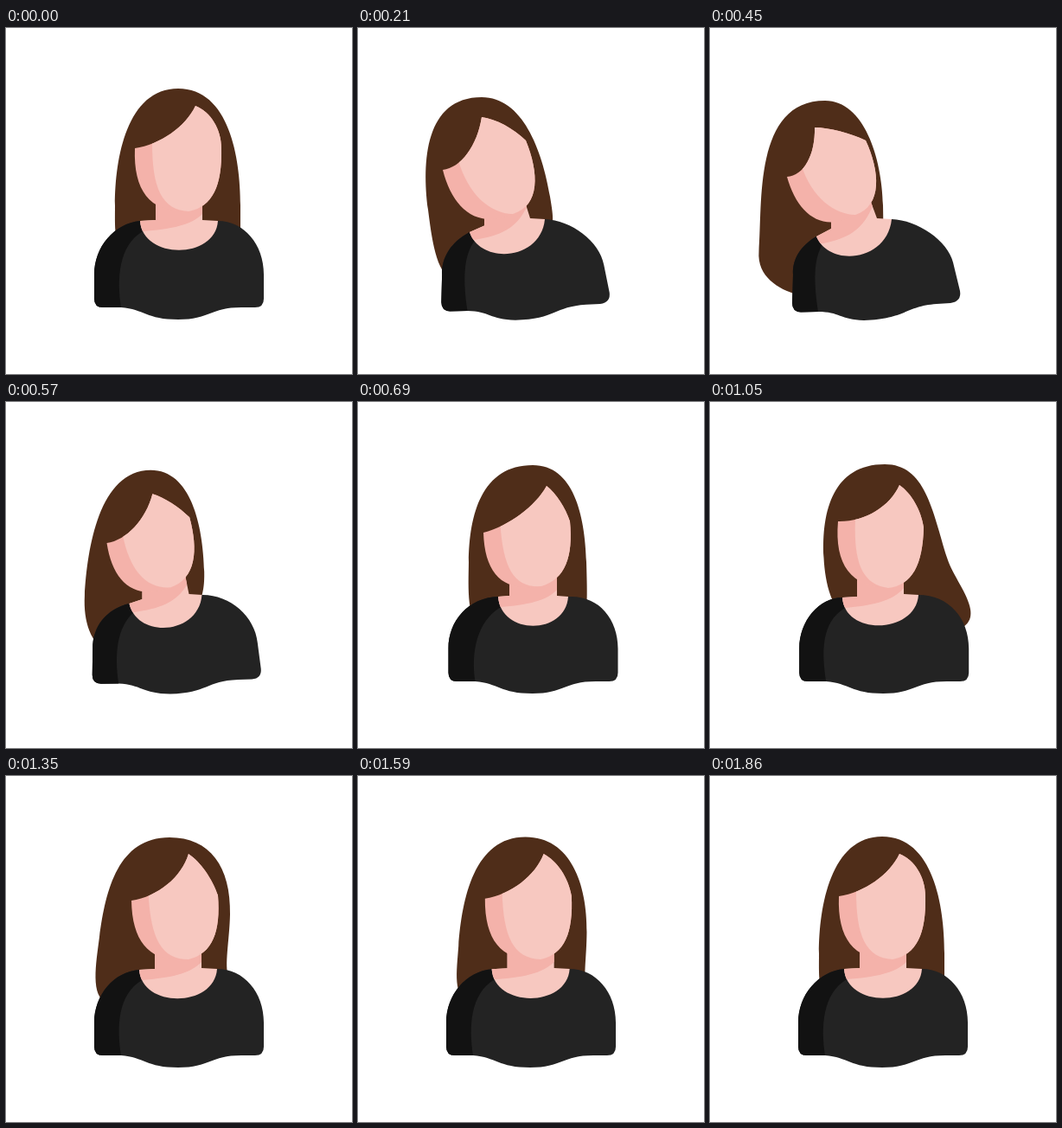
These frames come from a looping animation (400 px wide and 400 px high, 6.89 s). An HTML page with a canvas:

```html
<!DOCTYPE html>
<html lang="en">
<head>
<meta charset="utf-8">
<title>Head tilt</title>
<style>
  html, body { margin: 0; width: 100%; height: 100%; overflow: hidden; background: #fff; }
  canvas { display: block; width: 400px; height: 400px; }
</style>
</head>
<body>
<canvas id="stage" width="400" height="400"></canvas>
<script>
const LOOP = 6890, STEP = 30, END = 1860;
const COLOR = { hair: '#4f2d19', shirt: '#232323', shade: '#121212', skin: '#f7c8c0', blush: '#f4b2aa' };
const ctx = document.getElementById('stage').getContext('2d');

// Smooth interpolation that never overshoots its keys; the last key returns to the first.
function track(keys) {
  const rows = [...keys, [END, ...keys[0].slice(1)]];
  const rate = (i, k) => (rows[i + 1][k] - rows[i][k]) / (rows[i + 1][0] - rows[i][0]);
  const slope = (i, k) => {
    if (i === 0 || i === rows.length - 1) return 0;
    const a = rate(i - 1, k), b = rate(i, k);
    return a * b > 0 ? 2 * a * b / (a + b) : 0;
  };
  return t => {
    let i = 0;
    while (i < rows.length - 2 && t >= rows[i + 1][0]) i++;
    const span = rows[i + 1][0] - rows[i][0], u = (t - rows[i][0]) / span;
    const s = u * u * (3 - 2 * u), p = u * (1 - u) * (1 - u), q = u * u * (u - 1);
    return rows[i].slice(1).map((v, n) => {
      const k = n + 1;
      return v + (rows[i + 1][k] - v) * s + span * (p * slope(i, k) + q * slope(i + 1, k));
    });
  };
}

// time, lean, sideways shift
const bodyAt = track([[0, 0, 0], [210, 0.81, 0], [450, 1, 0], [690, 0, 2.5], [1050, 0, 1.2], [1350, 0, 0]]);

// time, left tip, left side and its slant, crown and its width, right side and its slant, right tip
const hairAt = track([
  [0, 124, 255, 126, 205, 0, 199, 70, 59, 271, 205, 0, 271, 240],
  [210, 90, 285, 81, 210, -0.13, 143, 80, 47, 222, 195, -0.17, 225, 222],
  [450, 80, 302, 56.5, 258, 0.08, 133, 84, 45, 200, 205, -0.02, 200, 222],
  [690, 125, 255, 128, 185, 0.01, 202, 73, 47, 264, 185, -0.03, 265, 225],
  [900, 149, 243, 133, 175, -0.06, 203, 72.5, 47, 276, 180, -0.31, 350, 250],
  [1050, 141, 243, 131.5, 180, -0.05, 202, 72, 47, 274, 180, -0.31, 324, 250],
  [1350, 97, 256, 108, 186, 0.13, 189, 71, 47, 259, 160, 0.02, 252, 219]
]);

// time, neckline left, neckline right, collar width
const neckAt = track([
  [0, 155, 223, 245, 223, 18],
  [210, 129, 236, 216, 221, 17],
  [450, 123, 241, 210, 221, 17],
  [690, 162, 225, 243, 225, 13],
  [1050, 153, 226, 241, 223, 17],
  [1350, 154, 224, 244, 223, 18]
]);

// time, fringe start, parting, right temple, chin, bulge of the fringe, bulge of the forehead
const faceAt = track([
  [0, 149, 139, 219, 90, 249, 139, 211, 212, 0.155, 0.2],
  [210, 98, 164, 143, 103, 194, 130, 179, 215, 0.205, 0.1],
  [450, 89, 172, 121, 115, 180, 130, 168, 216, 0.25, 0.065],
  [690, 145, 151, 218, 97, 245, 138, 212, 213, 0.125, 0.09],
  [1050, 148, 138, 219, 96, 247, 145, 206, 215, 0.195, 0.13],
  [1350, 145, 144, 211, 90, 245, 138, 211, 212, 0.185, 0.1]
]);

const upright = [125,226, 102,253, 102,285, 102,313, 102,323, 112,323, 133,323, 160,325, 162,337, 199,337,
  236,337, 236,323, 272,323, 288,323, 298,323, 298,313, 298,285, 298,250, 275,223];
const leaning = [104,252, 95,268, 96,285, 95,318, 95,328, 105,328.5, 125,328, 150,328, 150,337, 178,338,
  228,336, 224,322, 262,319, 278,318, 291,316, 289,304, 281,271, 275,246, 240,222];

const SIZE = { M: 2, L: 2, Q: 4, C: 6 };
function shape(cmds, nums) {
  let at = 0;
  return new Path2D([...cmds].map(c => c + nums.slice(at, at += SIZE[c]).join(' ')).join('') + 'Z');
}

const add = (p, x, y) => [p[0] + x, p[1] + y];

// Point beside the line from a to b: part of the way along, pushed out by a share of its length.
function beside(a, b, along, out) {
  const x = b[0] - a[0], y = b[1] - a[1];
  return add(a, along * x - out * y, along * y + out * x);
}

function fill(path, color) {
  ctx.fillStyle = color;
  ctx.fill(path);
}

function fillInside(clip, path, color) {
  ctx.save();
  ctx.clip(clip);
  fill(path, color);
  ctx.restore();
}

function drawHair(t, lean) {
  const [ax, ay, lx, ly, ls, tx, ty, wide, rx, ry, rs, bx, by] = hairAt(t);
  fill(shape('MCCCC', [
    ax + 20, ay + 6, ax, ay, lx - 30 * ls, ly + 30, lx, ly,
    lx + 55 * ls, ly - 55, tx - 59 - 24 * lean ** 6, ty, tx, ty,
    tx + wide, ty, rx + 55 * rs, ry - 55, rx, ry,
    rx - 30 * rs, ry + 30, bx, by, rx + (bx - rx) * 0.22, by + 14
  ]), COLOR.hair);
}

function drawTorso(t, lean, shift) {
  const [lx, ly, rx, ry, collar] = neckAt(t);
  const left = [lx, ly], right = [rx, ry];
  const shadeStart = add(left, 3 + 5 * lean, 12 - 4 * lean);

  const body = upright.map((v, i) => v + (leaning[i] - v) * lean + (i % 2 ? 0 : shift));
  const hem = body.slice(12, 14);
  fill(shape('MCLQLCCLQLC', [...left, ...body, ...right]), COLOR.shirt);
  fill(shape('MCLQLC', [
    ...left, ...body.slice(0, 14),
    ...add(hem, -5, -33), ...add(shadeStart, 16 * lean - 28, 17), ...shadeStart
  ]), COLOR.shade);

  const nearL = add(left, collar, -1 - 8 * lean), nearR = add(right, -collar, -1);
  const skin = shape('MCLLLL', [
    ...left, ...add(left, 3 + 12 * lean, 45 - 9 * lean), ...add(right, -3 - 2 * lean, 45 + 4 * lean), ...right,
    ...nearR, ...add(nearR, -10 * lean, -22 - 5 * lean), ...add(nearL, 0, -27), ...nearL
  ]);
  fill(skin, COLOR.skin);

  const [sx, sy] = shadeStart, [ex, ey] = add(nearR, 1 - 5 * lean, -8 - 9 * lean);
  const dx = ex - sx, dy = sy - ey;
  fillInside(skin, shape('MCLLL', [
    sx, sy, sx + 0.45 * dx, sy - 0.12 * dy, ex - 0.2 * dx, ey + 0.7 * dy, ex, ey,
    ex + 10, 180, sx - 40, 180, sx - 40, sy
  ]), COLOR.blush);
}

function drawFace(t, lean) {
  const f = faceAt(t);
  const [start, part, temple, chin] = [0, 2, 4, 6].map(i => f.slice(i, i + 2));
  const [bulge, brow] = f.slice(8);

  // Face axes: from fringe start to temple, and down towards the chin.
  const ux = (temple[0] - start[0]) / 100, uy = (temple[1] - start[1]) / 100;
  const vx = (chin[0] - start[0] - 62 * ux) / 73, vy = (chin[1] - start[1] - 62 * uy) / 73;
  const at = (x, y, dx = 0, dy = 0) =>
    add(start, x * ux + y * vx + dx * lean, x * uy + y * vy + dy * lean);

  const outline = shape('MCCCC', [
    ...start,
    ...beside(start, part, 0.31 - 0.15 * lean, bulge), ...beside(start, part, 0.73 - 0.15 * lean, bulge), ...part,
    ...beside(part, temple, 0.27, -brow), ...beside(part, temple, 0.67, -brow), ...temple,
    ...at(101, 43, 2, -6), ...at(90, 68, 8, 6), ...chin,
    ...at(19, 75, 0, 2), ...at(-2, 51, -2, -7), ...start
  ]);
  fill(outline, COLOR.blush);

  const cheek = at(20, -6);
  fillInside(outline, shape('MLCLLL', [
    cheek[0], 60, ...cheek, ...at(20, 46, -4, -11), ...at(31, 71, 6, -11), ...chin,
    chin[0], 240, 300, 240, 300, 60
  ]), COLOR.skin);
}

function draw(t) {
  const [lean, shift] = bodyAt(t);
  ctx.fillStyle = '#fff';
  ctx.fillRect(0, 0, 400, 400);
  drawHair(t, lean);
  drawTorso(t, lean, shift);
  drawFace(t, lean);
}

const begin = performance.now();
function tick() {
  const t = (performance.now() - begin) % LOOP;
  draw(Math.min(Math.floor(t / STEP) * STEP, END));
  requestAnimationFrame(tick);
}
tick();
</script>
</body>
</html>
```
